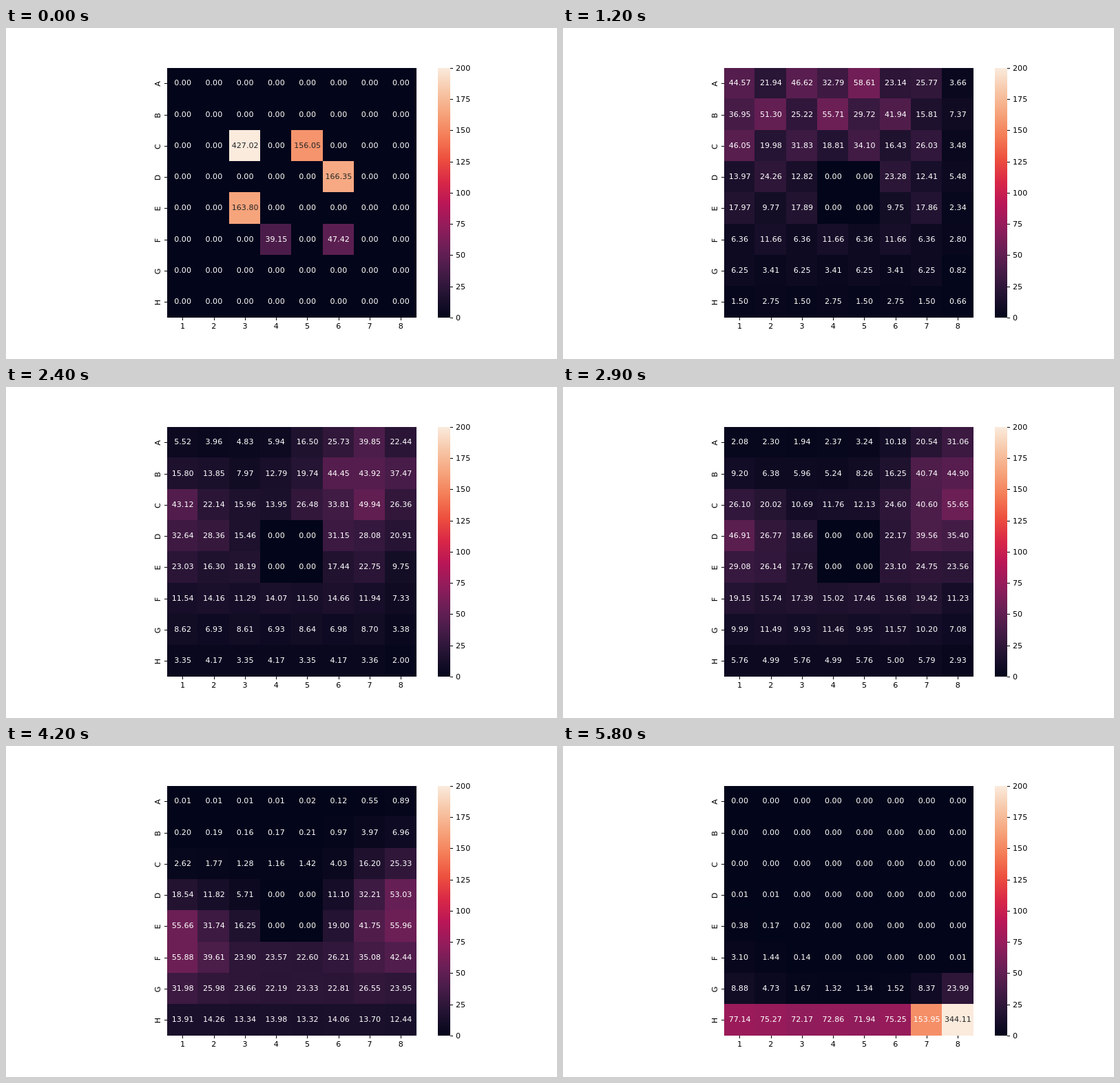
Recreate the animation shown at these times as an HTML page. Size 800 px wide and 480 px high, loop 5900 ms.

```html
<!DOCTYPE html>
<html lang="en">
<head>
<meta charset="utf-8">
<title>Heatmap</title>
<style>
  html, body { margin: 0; width: 100%; height: 100%; overflow: hidden; background: #fff; }
  svg { display: block; width: 800px; height: 480px; }
  text { font: 11.11px "DejaVu Sans", sans-serif; }
  .mid { text-anchor: middle; }
  rect { shape-rendering: crispEdges; }
</style>
</head>
<body>
<svg id="stage" viewBox="0 0 800 480"></svg>
<script>
const STEP = 100, LOOP = 5900, LAST = 58, MAX = 200, PITCH = 45.25;
const EDGES = [0, 44, 90, 135, 180, 226, 271, 316, 362];
const LEFT = 234, TOP = 58, SIZE = 362, ROWS = 'ABCDEFGH';
const STOPS = ['03051a', '221331', '451c47', '691f55', '921c5b', 'b91657',
  'd92847', 'ed503e', 'f47d57', 'f6a47c', 'f7c7a8', 'faebdd'];
const RGB = STOPS.map(h => [0, 2, 4].map(i => parseInt(h.slice(i, i + 2), 16)));

const mix = (a, b, w) => a + (b - a) * w;
const total = list => list.reduce((a, b) => a + b, 0);
const bell = (d, spread) => Math.exp(-d * d / (2 * spread * spread));

// The first board holds only a few cells.
const OPENING = { C3: 427.02, C5: 156.05, D6: 166.35, E3: 163.80, F4: 39.15, F6: 47.42 };
const opening = Array.from({ length: 64 }, (_, i) => OPENING[ROWS[i >> 3] + (i % 8 + 1)] ?? 0);
const SUM = total(opening), SPREAD_STEPS = 6;

// Strength over time of the band and of the left and right peaks.
const KNOTS = [6, 17, 24, 34, 42, 58];
const BAND = [20, 18, 17, 19, 25, 124];
const LEFT_PEAK = [43, 32, 28, 26, 45, 8];
const RIGHT_PEAK = [38, 42, 42, 52, 52, 280];

function strength(track, step) {
  const n = Math.max(step, KNOTS[0]);
  const i = Math.max(1, KNOTS.findIndex(k => k >= n));
  const w = (n - KNOTS[i - 1]) / (KNOTS[i] - KNOTS[i - 1]);
  return track[i - 1] ** (1 - w) * track[i] ** w;
}

function normalise(list) {
  const scale = SUM / total(list);
  return list.map(v => v * scale);
}

// A wide band sinks down the board; one peak slides down the left side,
// another crosses the top and then sinks along the right side.
function wave(step) {
  const p = step / LAST, late = p ** 2.2;
  const band = strength(BAND, step), left = strength(LEFT_PEAK, step);
  const right = strength(RIGHT_PEAK, step);
  const bandRow = 1.6 + 5.9 * p ** 1.3, bandSpread = 2.3 - 1.8 * late;
  const leftRow = 0.115 * (step - 4);
  const x = Math.min(7, 0.9 + 0.21 * step), y = 7 * late;
  const spreadX = 1.8 - 1.15 * p, spreadY = 0.45 + Math.sin(Math.PI * p);
  const checker = 0.8 * Math.exp(-step / 12);

  return normalise(opening.map((_, i) => {
    const r = i >> 3, c = i & 7;
    if ((r === 3 || r === 4) && (c === 3 || c === 4)) return 0;
    const reach = c === 7 ? Math.min(1, step / 50) : 1;
    const value = band * reach * bell(r - bandRow, bandSpread)
      + left * bell(c, 0.8) * bell(r - leftRow, 0.9)
      + right * bell(c - x, spreadX) * bell(r - y, spreadY);
    return value * (1 + checker * ((step + r + c) % 2 ? -1 : 1));
  }));
}

function cellsAt(step) {
  const w = Math.min(1, step / SPREAD_STEPS), soft = 0.5;
  const flow = wave(step);
  return normalise(opening.map((v, i) =>
    Math.max(0, (v + soft) ** (1 - w) * (flow[i] + soft) ** w - soft)));
}

function heat(value) {
  const p = Math.min(1, value / MAX) * (RGB.length - 1);
  const i = Math.min(RGB.length - 2, Math.floor(p));
  return RGB[i].map((c, j) => Math.round(mix(c, RGB[i + 1][j], p - i)));
}

function luminance(rgb) {
  const [r, g, b] = rgb.map(c => c / 255).map(c =>
    c <= 0.03928 ? c / 12.92 : ((c + 0.055) / 1.055) ** 2.4);
  return 0.2126 * r + 0.7152 * g + 0.0722 * b;
}

const stage = document.getElementById('stage');
function add(tag, attrs, content = '', parent = stage) {
  const el = document.createElementNS('http://www.w3.org/2000/svg', tag);
  for (const name in attrs) el.setAttribute(name, attrs[name]);
  el.textContent = content;
  return parent.appendChild(el);
}
const box = (x, y, width, height, fill = '#000') => add('rect', { x, y, width, height, fill });
const label = (x, y, content, cls = 'mid') => add('text', { x, y, class: cls }, content);

const midX = k => LEFT + PITCH * (k + 0.5);
const tickX = k => Math.round(midX(k) - 0.3);
const rowY = k => Math.round(80.3 + PITCH * k);

const tiles = [], labels = [];
for (let i = 0; i < 64; i++) {
  const r = i >> 3, c = i & 7;
  tiles.push(box(LEFT + EDGES[c], TOP + EDGES[r], EDGES[c + 1] - EDGES[c], EDGES[r + 1] - EDGES[r]));
}
for (let i = 0; i < 64; i++) labels.push(label(midX(i & 7), rowY(i >> 3) + 3, ''));

for (let k = 0; k < 8; k++) {
  const y = rowY(k);
  box(tickX(k), 420, 1, 4);
  label(midX(k), 436, k + 1);
  box(230, y, 4, 1);
  add('text', { class: 'mid', transform: `translate(224 ${y + 1}) rotate(-90)` }, ROWS[k]);
}

const ramp = add('linearGradient', { id: 'ramp', x1: 0, y1: 1, x2: 0, y2: 0 });
STOPS.forEach((c, i) =>
  add('stop', { offset: i / (STOPS.length - 1), 'stop-color': '#' + c }, '', ramp));
box(627, TOP, 18, SIZE, 'url(#ramp)');
for (let k = 0; k <= 8; k++) {
  const y = Math.round(57.8 + PITCH * k);
  box(645, y, 4, 1);
  label(653, y + 4, MAX - 25 * k, '');
}

function draw(step) {
  cellsAt(step).forEach((v, i) => {
    const rgb = heat(v);
    tiles[i].setAttribute('fill', `rgb(${rgb})`);
    labels[i].setAttribute('fill', luminance(rgb) > 0.408 ? '#262626' : '#fff');
    labels[i].textContent = v.toFixed(2);
  });
}

let start, shown = 0;
function tick(now) {
  start ??= now;
  const step = Math.floor((now - start) % LOOP / STEP);
  if (step !== shown) draw(shown = step);
  requestAnimationFrame(tick);
}
draw(0);
requestAnimationFrame(tick);
</script>
</body>
</html>
```
